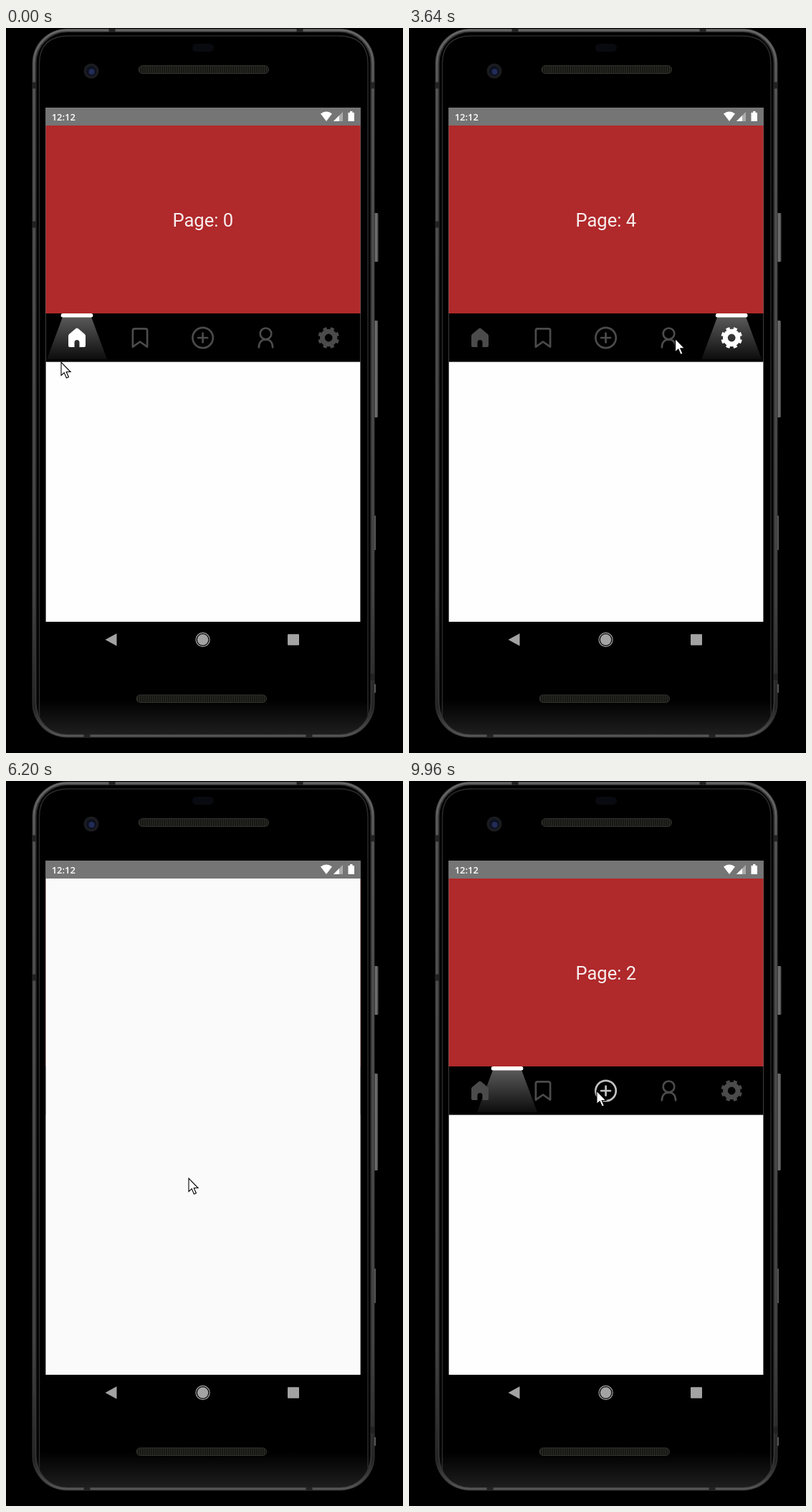
Write an HTML page that moves like this. It is 554x1011 px and loops after 10 s.

```html
<!DOCTYPE html>
<html lang="en">
<head>
<meta charset="utf-8">
<title>Bottom navigation</title>
<style>
  html, body { margin: 0; width: 100%; height: 100%; overflow: hidden; background: #000; }
  svg { display: block; width: 554px; height: 1011px; font-family: Roboto, sans-serif; }
  .line { fill: none; stroke: currentColor; stroke-width: 2.7; stroke-linejoin: round; stroke-linecap: round; }
  .solid { fill: currentColor; }
</style>
</head>
<body>
<svg viewBox="0 0 554 1011">
  <defs>
    <linearGradient id="beamFill" x2="0" y2="1">
      <stop stop-color="#fff" stop-opacity=".35"/>
      <stop offset="1" stop-color="#fff" stop-opacity=".05"/>
    </linearGradient>
    <linearGradient id="rim" x2="0" y2="1">
      <stop stop-color="#666"/><stop offset=".1" stop-color="#555"/>
      <stop offset=".8" stop-color="#444"/><stop offset=".96" stop-color="#222"/><stop offset="1" stop-color="#555"/>
    </linearGradient>
    <linearGradient id="chin" x2="0" y2="1">
      <stop offset=".95"/><stop offset="1" stop-color="#1e1e1e"/>
    </linearGradient>
    <linearGradient id="key"><stop stop-color="#333"/><stop offset=".5" stop-color="#777"/><stop offset="1" stop-color="#444"/></linearGradient>
    <pattern id="mesh" width="3" height="3" patternUnits="userSpaceOnUse">
      <rect width="3" height="3" fill="#171714"/><rect width="1" height="3" fill="#292925"/>
    </pattern>
    <clipPath id="screen"><rect x="55.6" y="111" width="438.8" height="717"/></clipPath>
  </defs>

  <!-- phone body -->
  <g fill="url(#key)">
    <rect x="513" y="258" width="6.5" height="68" rx="1.5"/>
    <rect x="513" y="408" width="6" height="135" rx="1.5"/>
    <rect x="513" y="680" width="3" height="48"/>
    <rect x="513" y="915" width="3" height="12"/>
  </g>
  <rect x="36.5" y="1" width="478" height="988.5" rx="48" fill="#333"/>
  <rect x="39" y="3" width="473" height="984" rx="46" fill="none" stroke="url(#rim)" stroke-width="3"/>
  <rect x="42.5" y="6" width="466" height="979" rx="43" fill="url(#chin)"/>
  <path d="M46.5 960V50Q46.5 11 88 11H464Q505 11 505 50V960" fill="none" stroke="#2a2a2a" stroke-width="1.5"/>
  <path d="M37 80h5M37 274h5M509 80h5M509 905h5M148 1v5M410 1v5M113 985v5M423 985v5" stroke="#222" stroke-width="9"/>
  <g fill="url(#mesh)" stroke="#33332f">
    <rect x="185" y="52.5" width="181.5" height="11" rx="5.5"/>
    <rect x="182" y="930" width="181.5" height="10.5" rx="5.2"/>
  </g>
  <rect x="260" y="22" width="30" height="11" rx="5.5" fill="#090a10"/>
  <circle cx="119" cy="60" r="10.5" fill="#1b1c20"/>
  <circle cx="119" cy="60" r="7" fill="#0e111f"/>
  <circle cx="119.5" cy="61" r="4" fill="#222c58"/>

  <g clip-path="url(#screen)">
    <rect x="55" y="111" width="440" height="717" fill="#fefefe"/>
    <rect x="55" y="136" width="440" height="262" fill="#b0292b"/>
    <text id="label" x="274.8" y="277" font-size="25.6" text-anchor="middle" fill="#f8eeee"></text>
    <rect x="55" y="398" width="440" height="67.6"/>
    <g id="beam">
      <path d="M-20 403H20L42 462H-42Z" fill="url(#beamFill)"/>
      <rect x="-22.3" y="398" width="44.6" height="5.4" rx="2.5" fill="#fff"/>
    </g>
    <g id="icons">
      <path class="solid" d="M87 429.5Q87 428 88 427L97.5 419Q99 418 100.5 419L110 427Q111 428 111 429.5V443Q111 445 109 445H102.5V438.5Q102.5 435 99 435T95.5 438.5V445H89Q87 445 87 443Z"/>
      <path class="line" d="M176.9 444.6V422Q176.9 419.4 179.5 419.4H194.5Q197.1 419.4 197.1 422V444.6L187 437.5Z"/>
      <g class="line"><circle cx="274.6" cy="432" r="14.2"/><path d="M274.6 425.5v13M268.1 432h13"/></g>
      <g class="line"><circle cx="362.5" cy="426.3" r="7.8"/><path d="M352.9 445.3C352.9 438 357 434.3 362.5 434.3S372.1 438 372.1 445.3"/></g>
      <g fill="none" stroke="currentColor">
        <circle cx="450.2" cy="432" r="8.8" stroke-width="6.8"/>
        <circle cx="450.2" cy="432" r="13" stroke-width="3.8" pathLength="16" stroke-dasharray="1" stroke-dashoffset="1.5"/>
      </g>
    </g>
    <rect id="blank" x="55" y="136" width="440" height="692" fill="#fafafa"/>

    <rect x="55" y="111" width="440" height="25" fill="#757575"/>
    <g fill="#fff">
      <text x="63.7" y="128.7" font-family="Open Sans, sans-serif" font-size="13" font-weight="600">12:12</text>
      <path d="M439 119.5Q447 113.5 455 119.5L447 130Z"/>
      <path d="M457 130L470 117V130Z" fill-opacity=".4"/><path d="M457 130L465 122V130Z"/>
      <path d="M477.5 118H480V116H483.5V118H486V130H477.5Z"/>
    </g>
  </g>

  <g fill="#a3a3a3">
    <path d="M138.5 853L154.5 844.3V861.7Z"/>
    <circle cx="274.6" cy="853" r="7.7"/>
    <circle cx="274.6" cy="853" r="9.6" fill="none" stroke="#a3a3a3" stroke-width="1.2"/>
    <rect x="393" y="845.2" width="16" height="15.6" rx="1"/>
  </g>
  <path id="cursor" d="M0 0V18.5L4.2 14.6 7.4 22 10.4 20.8 7.2 13.5H13Z" fill="#fff" stroke="#000" stroke-width="1.1"/>
</svg>

<script>
const LOOP = 10000, SLIDE = 300, RELEASE = 180, RESTART = 7480;
const $ = id => document.getElementById(id);
const icons = [...$('icons').children];
const label = $('label'), beam = $('beam'), blank = $('blank'), cursor = $('cursor');

// Each tap: finger down, finger up, page selected
const taps = [
  [880, 1006, 1], [2050, 2140, 3], [3070, 3165, 4], [4310, 4443, 1], [9710, 9896, 2]
].map(([down, up, page]) => ({ down, up, page }));

// Pointer stops: time, x, y
const stops = [
  [20, 77, 466], [880, 185, 433], [1300, 185, 433], [2040, 346, 430], [2600, 346, 430],
  [3050, 440, 432], [3350, 440, 432], [4200, 188, 437], [4560, 188, 437], [4680, 195, 447],
  [5080, 255, 554], [8180, 255, 554], [8700, 80, 440], [9220, 170, 473], [9560, 262, 432]
];

const clamp = v => Math.max(0, Math.min(1, v));
const mix = (a, b, p) => a + (b - a) * p;
const smooth = p => p * p * (3 - 2 * p);
const centre = page => 99 + 87.8 * page;

function pointerAt(t) {
  const next = stops.findIndex(s => s[0] > t);
  if (next === 0) return stops[0].slice(1);
  if (next < 0) return stops[stops.length - 1].slice(1);
  const [t0, x0, y0] = stops[next - 1], [t1, x1, y1] = stops[next];
  const p = smooth((t - t0) / (t1 - t0));
  return [mix(x0, x1, p), mix(y0, y1, p)];
}

function iconOpacity(page, t) {
  let opacity = 1;
  for (const tap of taps) {
    if (tap.page !== page || t < tap.down) continue;
    opacity = t < tap.up
      ? mix(1, .4, clamp((t - tap.down) / 40))
      : mix(1, .4, (1 - clamp((t - tap.up) / RELEASE)) ** 2);
  }
  return opacity;
}

function draw(t) {
  let page = 0, x = centre(0), scale = 1;
  if (t >= RESTART) {
    scale = clamp((t - RESTART) / SLIDE);
    x = mix(55, x, scale);
  }
  for (const tap of taps) {
    if (t < tap.up || (t >= RESTART && tap.up < RESTART)) continue;
    x = mix(centre(page), centre(tap.page), clamp((t - tap.up) / SLIDE));
    page = tap.page;
  }
  label.textContent = 'Page: ' + page;
  beam.setAttribute('transform', `translate(${x}) scale(${scale} 1)`);
  icons.forEach((icon, i) => {
    icon.style.color = i === page ? '#fff' : '#4b4b4b';
    icon.style.opacity = iconOpacity(i, t);
  });
  blank.style.opacity = t < RESTART ? clamp((t - 5890) / 300) : 0;
  cursor.setAttribute('transform', `translate(${pointerAt(t)})`);
}

function tick() {
  draw(performance.now() % LOOP);
  requestAnimationFrame(tick);
}
tick();
</script>
</body>
</html>
```
